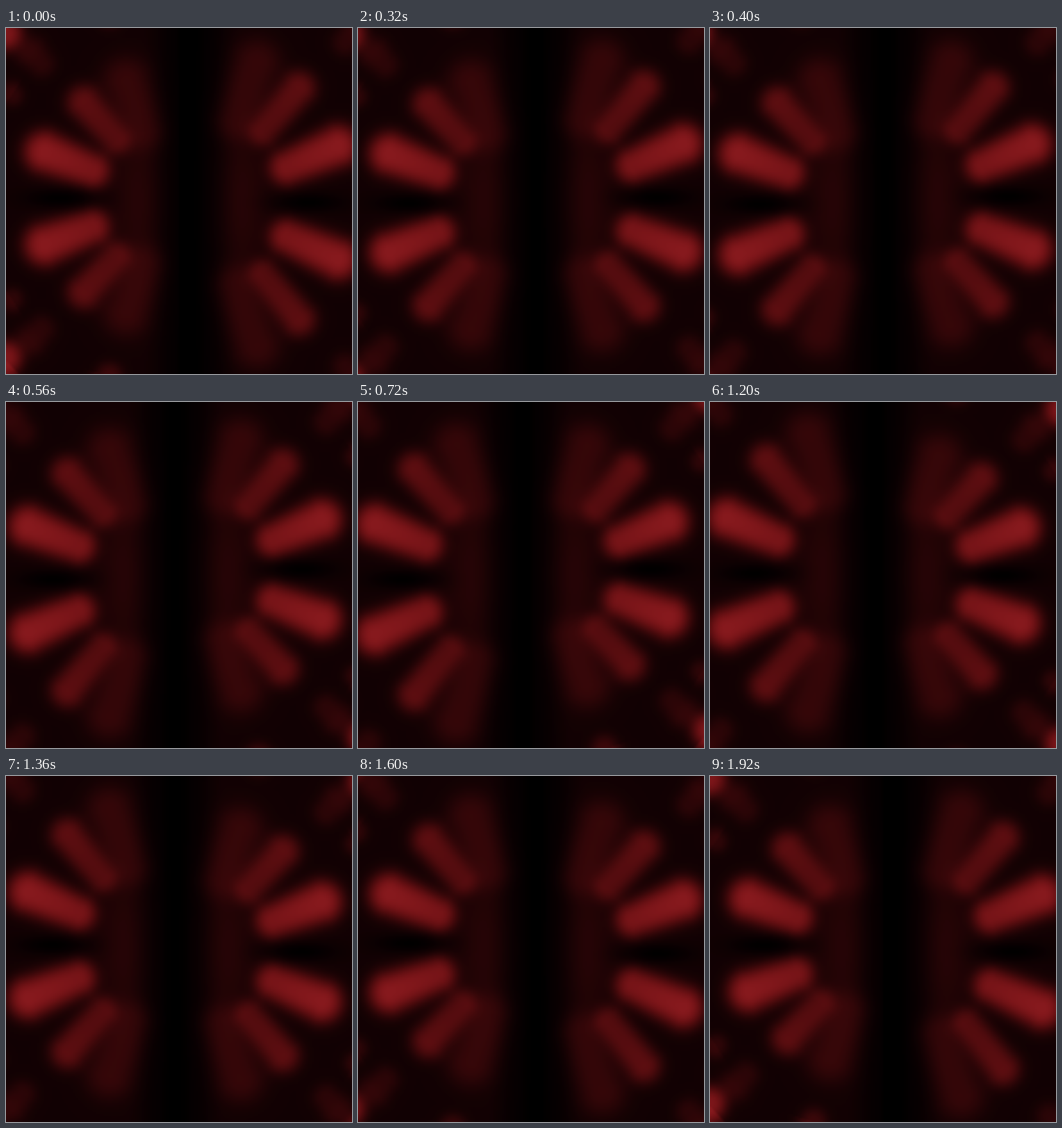
An HTML page with a canvas that plays this animation: 540 by 540 pixels, repeating every 2000 ms.

```html
<!DOCTYPE html>
<html lang="en">
<head>
<meta charset="utf-8">
<title>Red lobes</title>
<style>
html, body { margin: 0; width: 100%; height: 100%; overflow: hidden; background: #000; }
canvas { display: block; width: 540px; height: 540px; }
</style>
</head>
<body>
<canvas id="stage" width="540" height="540"></canvas>
<script>
const SIZE = 540, N = 180, CELL = SIZE / N;
const STEP = 80, STEPS = 25;
const HUB = { x: 240, y: 269 };
const ctx = document.getElementById('stage').getContext('2d');
const small = document.createElement('canvas');
small.width = small.height = N;
const sctx = small.getContext('2d');
const img = sctx.createImageData(N, N);

const clamp = v => Math.max(0, Math.min(1, v));
const smooth = (a, b, v) => {
  const f = clamp((v - a) / (b - a));
  return f * f * (3 - 2 * f);
};
const bell = (d, w) => Math.exp(-(d * d) / (w * w));

// One half of the stage: lobes fan out from the hub and sway with the phase.
function makeSide(phase) {
  const c = Math.cos(phase), s = Math.sin(phase - 0.55);
  const lobes = [];

  function place(angle, r, sign) {
    const a = angle * Math.PI / 180;
    const h = r * Math.sin(a);
    return {
      x: HUB.x - r * Math.cos(a) + (12 + 0.035 * r) * c,
      y: HUB.y + sign * h * (1 - 0.1 * c) + s * (4 + 0.05 * h)
    };
  }

  function lobe(angle, outer, inner, width, power) {
    for (const sign of [-1, 1]) {
      const p = place(angle, outer, sign), q = place(angle, inner, sign);
      const dx = q.x - p.x, dy = q.y - p.y;
      lobes.push({ x: p.x, y: p.y, dx, dy, len: dx * dx + dy * dy || 1, width, power });
    }
  }

  // main ring
  lobe(22, 214, 132, 31, 0.92);
  lobe(50, 214, 132, 27, 0.47);
  lobe(70, 214, 125, 37, 0.19);
  // outer ring
  lobe(46.5, 392, 388, 29, 1);
  lobe(48, 335, 310, 25, 0.18);
  lobe(35, 310, 308, 20, 0.2);
  lobe(72, 332, 330, 24, 0.3);

  return { lobes, axis: 270 + 19 * c, glow: 188 + 17 * c, dark: { x: 76 + 9 * c, y: HUB.y + 8 * s } };
}

function shade(side, x, y) {
  const off = side.axis - x;
  let v = 0.025 * smooth(5, 30, off) + 0.065 * smooth(25, 80, off);
  v += 0.11 * bell(x - side.glow, 38) * bell(y - HUB.y, 140);
  for (const l of side.lobes) {
    const px = x - l.x, py = y - l.y;
    const f = clamp((px * l.dx + py * l.dy) / l.len);
    const d = Math.hypot(px - f * l.dx, py - f * l.dy) / (l.width * (1 - 0.12 * f));
    if (d < 2.2) v += l.power * (1 - 0.22 * f) * Math.exp(-Math.pow(d, 2.5));
  }
  return v * (1 - 0.95 * bell(x - side.dark.x, 54) * bell(y - side.dark.y, 15));
}

function draw(step) {
  const phase = (step + 0.5) / STEPS * Math.PI * 2;
  const sides = [makeSide(phase), makeSide(phase + Math.PI)];
  let p = 0;
  for (let j = 0; j < N; j++) {
    for (let i = 0; i < N; i++) {
      const right = i >= N / 2;
      const col = right ? N - 1 - i : i;
      const v = Math.min(1, shade(sides[+right], (col + 0.5) * CELL, (j + 0.5) * CELL));
      img.data[p++] = v * (200 - 66 * v);
      img.data[p++] = 26 * v - 1;
      img.data[p++] = 29 * v;
      img.data[p++] = 255;
    }
  }
  sctx.putImageData(img, 0, 0);
  ctx.imageSmoothingQuality = 'high';
  ctx.drawImage(small, 0, 0, SIZE, SIZE);
}

let shown = -1;
const start = performance.now();
function tick(now) {
  const step = Math.floor(Math.max(0, now - start) / STEP) % STEPS;
  if (step !== shown) draw(shown = step);
  requestAnimationFrame(tick);
}
tick(start);
</script>
</body>
</html>
```
